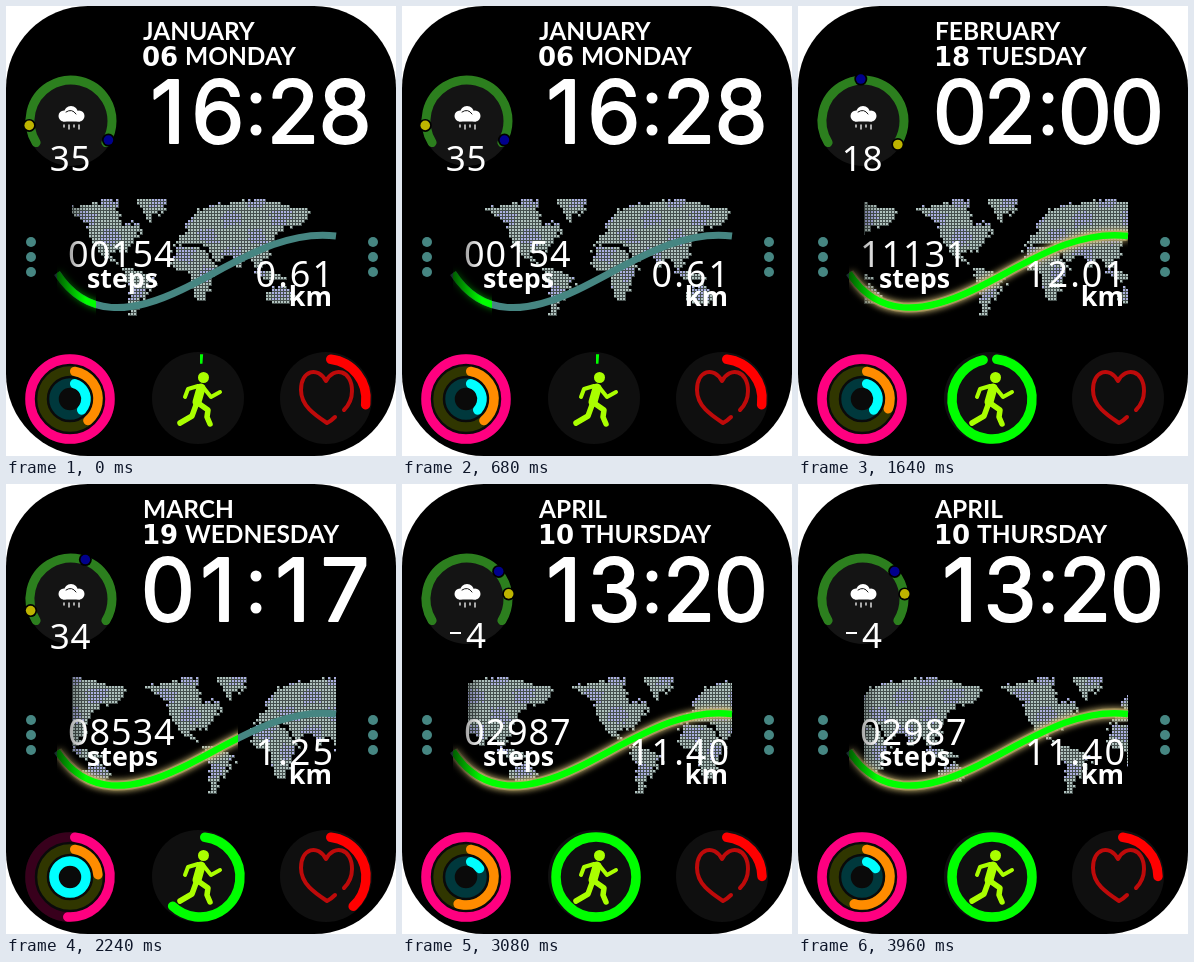
Write an HTML page with a canvas that moves like this. It is 390 px wide and 450 px high and loops after 4000 ms.

```html
<!DOCTYPE html>
<html lang="en">
<head>
<meta charset="utf-8">
<title>Watch face</title>
<style>
  html, body { margin: 0; width: 100%; height: 100%; overflow: hidden; background: #fff; }
  canvas { display: block; }
</style>
</head>
<body>
<canvas id="face" width="390" height="450"></canvas>
<script>
const ctx = document.getElementById('face').getContext('2d');
const LOOP = 4000, STEPS = 62, SCROLL = 2.36;
const TEAL = '#468682', SANS = '"Noto Sans", "Open Sans", sans-serif';

// Angles are degrees clockwise from the top; curve is the x the green line reaches.
const states = [
  { month: 'JANUARY', day: '06', week: 'MONDAY', time: '1628', temp: '35', steps: '00154', km: '0.61',
    high: -96, low: 117, rings: [360, 150, 150], curve: 90, run: 4, heart: 105 },
  { month: 'FEBRUARY', day: '18', week: 'TUESDAY', time: '0200', temp: '18', steps: '11131', km: '12.01',
    high: 124, low: -3, rings: [360, 120, 150], curve: 330, run: 354, heart: 0 },
  { month: 'MARCH', day: '19', week: 'WEDNESDAY', time: '0117', temp: '34', steps: '08534', km: '1.25',
    high: -106, low: 20, rings: [190, 95, 360], curve: 232, run: 230, heart: 144 },
  { month: 'APRIL', day: '10', week: 'THURSDAY', time: '1320', temp: '-4', steps: '02987', km: '11.40',
    high: 83, low: 49, rings: [360, 206, 75], curve: 330, run: 360, heart: 96 }
];

// World map: Miller projection of a few key points per coast, roughened by noise on a dot grid.
const MAP = { left: 66, top: 193, right: 330, bottom: 316, width: 264 };
const land = new Path2D();

function coast(points) {
  points.split(' ').forEach((point, i) => {
    const [lon, lat] = point.split(',').map(Number);
    const x = (lon + 180) * MAP.width / 360;
    const y = 75 - 55 * Math.log(Math.tan(Math.PI / 4 + 0.4 * lat * Math.PI / 180));
    land[i ? 'lineTo' : 'moveTo'](x, y);
  });
  land.closePath();
}

coast('-160,70 -90,77 -80,55 -60,60 -55,50 -80,27 -97,27 -88,15 -80,8 -105,20 -124,40 -130,58'); // North America
coast('-70,80 -45,60 -20,72 -25,82'); // Greenland
coast('-77,9 -50,1 -35,-7 -48,-28 -70,-54 -71,-18 -81,-4'); // South America
coast('-6,36 32,31 43,11 51,11 40,-12 30,-33 18,-34 9,4 -8,5 -17,15'); // Africa
coast('-9,37 5,50 8,60 25,71 105,77 179,68 160,55 137,54 122,38 121,25 109,12 103,2 90,22 77,8 68,24 55,20 45,13 35,36'); // Eurasia
coast('97,4 115,-9 150,-8 118,5'); // Indonesia
coast('114,-23 136,-12 153,-27 147,-38 116,-35'); // Australia

const world = document.createElement('canvas');
world.width = MAP.width;
world.height = MAP.bottom - MAP.top;
const grid = world.getContext('2d');
for (let y = 0; y < world.height; y += 3) {
  for (let x = 0; x < world.width; x += 3) {
    const noise = Math.abs(Math.sin(x * 12.9 + y * 78.2) * 43758) % 1;
    if (!grid.isPointInPath(land, x + noise * 5 - 1, y + noise * 3)) continue;
    const bluish = Math.sin(x * 0.13) * Math.cos(y * 0.17) + noise * 0.6 > 0.65;
    grid.fillStyle = '#46504e';
    grid.fillRect(x, y, 3, 3);
    grid.fillStyle = bluish ? '#acb0e0' : '#b0c2be';
    grid.fillRect(x, y, 2, 2);
  }
}

const wave = new Path2D('M51 267C80 312 125 308 175 284S275 223 330 230');
const heart = new Path2D('M320 375C312 360 295 364 295 384C295 400 309 409 321 417Q325 415 329 411' +
  'M320 375C328 360 346 364 346 385Q346 396 338 404');

const radians = deg => deg * Math.PI / 180;

function disc(x, y, r, color) {
  ctx.fillStyle = color;
  ctx.beginPath();
  ctx.arc(x, y, r, 0, 2 * Math.PI);
  ctx.fill();
}

function stroke(path, color, width) {
  ctx.strokeStyle = color;
  ctx.lineWidth = width;
  ctx.stroke(typeof path === 'string' ? new Path2D(path) : path);
}

// Arc whose round caps lie inside the given angles; too short an arc becomes a flat tick.
function arc(x, y, r, from, to, color, width) {
  if (to === from) return;
  const cap = width / 2 / r;
  const sweep = radians(to - from);
  const inset = sweep > 2 * cap && to - from < 360 ? cap : 0;
  const begin = radians(from - 90);
  ctx.beginPath();
  ctx.arc(x, y, r, begin + inset, begin + sweep - inset);
  ctx.lineCap = inset ? 'round' : 'butt';
  ctx.strokeStyle = color;
  ctx.lineWidth = width;
  ctx.stroke();
  ctx.lineCap = 'round';
}

function text(value, x, y, font, align = 'left', spacing = 0) {
  ctx.font = font;
  ctx.textAlign = align;
  ctx.letterSpacing = spacing + 'px';
  ctx.fillStyle = '#fff';
  ctx.fillText(value, x, y);
}

function drawDate(s) {
  const bold = '700 24.5px Lato, sans-serif';
  text(s.month, 137, 34, bold);
  text(s.day, 136, 60, '700 26px "DejaVu Sans", sans-serif');
  text(s.week, 179, 59, bold);
  ctx.lineJoin = 'round';
  ctx.strokeStyle = '#fff';
  ctx.lineWidth = 2;
  [162, 212, 287, 339].forEach((x, i) => {
    text(s.time[i], x, 136.5, '400 86px Inter, sans-serif', 'center');
    ctx.strokeText(s.time[i], x, 136.5);
  });
  disc(250, 92, 5.5, '#fff');
  disc(250, 124, 5.5, '#fff');
}

function drawWeather(s) {
  disc(65, 115, 45, '#141414');
  arc(65, 115, 41, -128, 128, '#2c7f1e', 9);
  for (const [deg, color] of [[s.low, '#00008c'], [s.high, '#beb400']]) {
    const x = 65 + 42 * Math.sin(radians(deg));
    const y = 115 - 42 * Math.cos(radians(deg));
    disc(x, y, 6.5, '#000');
    disc(x, y, 4.8, color);
  }
  disc(58, 110, 5.5, '#fff');
  disc(65, 107, 7, '#fff');
  disc(73, 110, 5.5, '#fff');
  ctx.fillRect(57, 108, 17, 7.5);
  stroke('M60 106Q66 102 70 108', '#141414', 1);
  for (let i = 0; i < 4; i++) stroke(`M${58 + i * 5} 119v${i % 2 ? 4 : 2}`, '#ddd', 1.5);
  const font = '500 35px ' + SANS;
  if (s.temp[0] === '-') {
    ctx.fillStyle = '#fff';
    ctx.fillRect(48, 148, 11, 2);
    text(s.temp[1], 74, 164, font, 'center');
  } else {
    text(s.temp, 64.5, 164.5, font, 'center', 0.8);
  }
}

function drawMap(s, step) {
  ctx.save();
  ctx.beginPath();
  ctx.rect(MAP.left, MAP.top, MAP.right - MAP.left, MAP.bottom - MAP.top);
  ctx.clip();
  const x = Math.round(44 + step * SCROLL);
  ctx.drawImage(world, x, MAP.top);
  ctx.drawImage(world, x - MAP.width, MAP.top);
  ctx.restore();

  ctx.lineCap = 'butt';
  stroke(wave, TEAL, 7);
  ctx.save();
  ctx.beginPath();
  ctx.rect(51, 180, s.curve - 51, 150);
  ctx.clip();
  ctx.shadowBlur = 7;
  ctx.shadowColor = s.curve > 100 ? '#d2be78' : '#00a000';
  if (s.curve > 100) stroke(wave, 'rgba(180,160,90,.6)', 10);
  stroke(wave, '#0f0', 6.5);
  ctx.restore();

  text(s.steps, 62, 261, '500 36px ' + SANS, 'left', 0.9);
  const fade = ctx.createLinearGradient(48, 0, 80, 0);
  fade.addColorStop(0, 'rgba(0,0,0,.7)');
  fade.addColorStop(1, 'rgba(0,0,0,0)');
  ctx.fillStyle = fade;
  ctx.fillRect(48, 190, 32, 128);
  text(s.km, 329, 281, '500 36px ' + SANS, 'right', 2);
  text('steps', 81, 282, '700 26.8px ' + SANS);
  text('km', 326, 300, '700 27px ' + SANS, 'right');

  for (const y of [236, 251, 266]) {
    disc(25, y, 5, TEAL);
    disc(367, y, 5, TEAL);
  }
}

function drawActivity(s) {
  const colors = [['#ff0080', '#38001c'], ['#ff8c00', '#303600'], ['#00ffff', '#00383c']];
  disc(64, 393, 45, '#0a0a0a');
  colors.forEach(([color, track], i) => {
    const r = 40 - 12 * i;
    arc(64, 393, r, 0, 360, track, 9.5);
    arc(64, 393, r, 0, s.rings[i], color, 9.5);
  });

  const lime = '#aaff00';
  disc(192, 392, 46, '#0f0f0f');
  arc(194, 393, 40, 0, s.run, '#0f0', 9.5);
  ctx.lineJoin = 'round';
  disc(197.5, 371.5, 5.5, lime);
  stroke('M195 382L191 396', lime, 9);
  stroke('M197 381L205 391L214 386M192 380L182 383L179 391', lime, 4);
  stroke('M192 397L202 404L201 411L204 418M190 399L186 410L174 417', lime, 5.5);

  disc(320, 392, 46, '#0f0f0f');
  arc(320, 393, 40, 0, s.heart, '#f00', 9.5);
  stroke(heart, '#be0a0a', 4);
}

function draw(t) {
  const s = states[Math.floor(t / LOOP * states.length)];
  ctx.fillStyle = '#fff';
  ctx.fillRect(0, 0, 390, 450);
  ctx.fillStyle = '#000';
  ctx.beginPath();
  ctx.roundRect(0, 0, 390, 450, 82);
  ctx.fill();
  drawDate(s);
  drawWeather(s);
  drawMap(s, Math.floor(t / LOOP * STEPS));
  drawActivity(s);
}

const start = performance.now();
function tick() {
  draw((performance.now() - start) % LOOP);
  requestAnimationFrame(tick);
}
tick();
</script>
</body>
</html>
```
